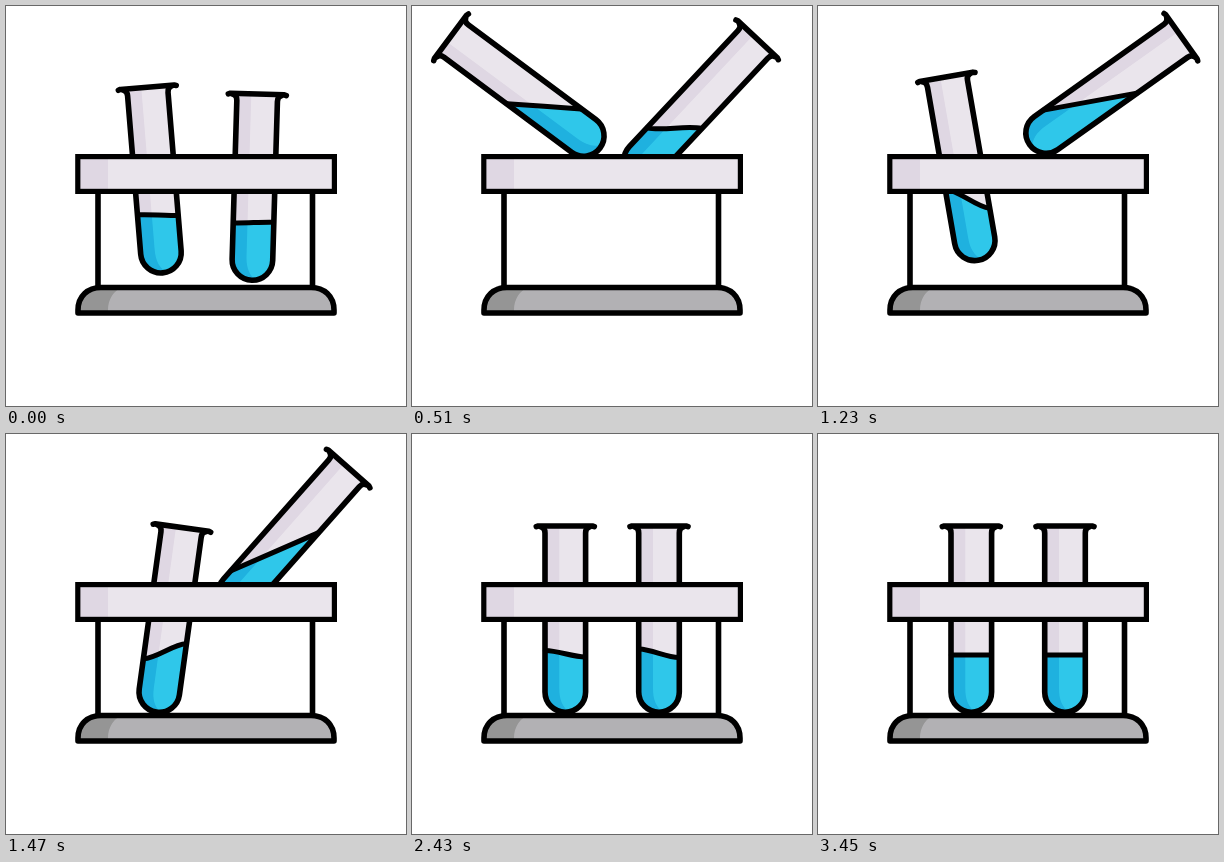
An HTML page that plays this animation: 400x400 px, repeating every 8.63 s.

```html
<!DOCTYPE html>
<html lang="en">
<head>
<meta charset="utf-8">
<title>Test tubes</title>
<style>
html, body { margin: 0; width: 100%; height: 100%; overflow: hidden; background: #fff; }
svg { display: block; width: 100%; height: 100%; }
.ink { fill: none; stroke: #000; stroke-width: 5.6; stroke-linecap: round; stroke-linejoin: round; }
</style>
</head>
<body>
<svg id="stage" viewBox="0 0 400 400">
  <defs>
    <clipPath id="glass"><path d="M-20.3-166V0a20.3 20.3 0 0 0 40.6 0V-166Z"/></clipPath>
    <clipPath id="foot"><path d="M72 307V304C72 290 82 281.5 95 281.5H305C318 281.5 328 290 328 304V307Z"/></clipPath>
  </defs>
  <path class="ink" d="M92 186V281M306.5 186V281"/>
  <g id="tubes"></g>
  <rect x="72" y="151" width="256" height="34" fill="#eae5ec"/>
  <rect x="72" y="151" width="30" height="34" fill="#dfd7e3"/>
  <rect class="ink" x="71.8" y="150.6" width="256.6" height="34.8" style="stroke-linejoin:miter;stroke-width:5.2"/>
  <g clip-path="url(#foot)">
    <rect x="70" y="280" width="260" height="29" fill="#b2b1b4"/>
    <path d="M70 280H119C109 283 102 292 102 304V309H70Z" fill="#959595"/>
  </g>
  <path class="ink" d="M72 307V304C72 290 82 281.5 95 281.5H305C318 281.5 328 290 328 304V307Z"/>
</svg>
<script>
const LOOP = 8630, STEP = 30, TILT = 55, REST = 3440;
const SHADE = 'V-4C-6 8-3 15 5 21H-21Z';

const clamp = u => Math.max(0, Math.min(1, u));
const span = (t, a, b) => clamp((t - a) / (b - a));
const smooth = u => u * u * (3 - 2 * u);

// Ease in and out along a bezier with handles at .35
function ease(u) {
  let lo = 0, hi = 1;
  for (let i = 0; i < 20; i++) {
    const m = (lo + hi) / 2;
    if (1.05 * m * (1 - m) + m * m * m < u) lo = m; else hi = m;
  }
  return smooth(lo);
}

// side: direction of lean; lag: delay of the drop
const tubes = [
  { x: 153.3, side: -1, lag: 0, rise: [-125, 650], fill: [-120, 840] },
  { x: 247, side: 1, lag: 480, rise: [-110, 990], fill: [-120, 1280] }
];

for (const tube of tubes) {
  const g = document.createElementNS('http://www.w3.org/2000/svg', 'g');
  g.innerHTML = `
    <g clip-path="url(#glass)">
      <rect x="-21" y="-166" width="42" height="188" fill="#eae5ec"/>
      <path d="M-21-166H-6${SHADE}" fill="#dfd7e3"/>
      <path class="liquid" fill="#2fc7ea"/>
      <path class="dark" fill="#1fb1df"/>
    </g>
    <path class="ink surface" style="stroke-width:5"/>
    <path class="ink" d="M-24-165Q-20.3-164-20.3-159V0a20.3 20.3 0 0 0 40.6 0V-159Q20.3-164 24-165"/>
    <path class="ink" d="M-29-165.3L-27-166H27L29-165.3"/>`;
  document.getElementById('tubes').append(g);
  tube.g = g;
  for (const name of ['liquid', 'dark', 'surface']) tube[name] = g.querySelector('.' + name);
}

// Lean in degrees; negative is the swing past upright
function lean(tube, t) {
  const d = t - tube.lag;
  if (d < 700) return TILT * ease(span(t, ...tube.rise));
  if (d < 1285) return TILT * (1 - span(d, 700, 1285) ** 2);
  if (d < 1420) return -8.5 * (1 - (1 - span(d, 1285, 1420)) ** 2);
  return -8.5 * (1 - smooth(span(d, 1420, 1720)));
}

// Half the height difference of the liquid across the tube
function slosh(tube, t) {
  const drop = 990 + tube.lag, land = 1440 + tube.lag;
  if (t < drop) return 43 * smooth(span(t, ...tube.fill));
  if (t < land) return 43 - 54 * smooth(span(t, drop, land));
  return -11 * (1 - span(t, land, REST)) * Math.cos((t - land) * 2 * Math.PI / 600);
}

function draw(t) {
  for (const tube of tubes) {
    const a = lean(tube, t), lift = Math.max(0, a / TILT);
    const x = tube.x - tube.side * 19 * lift, y = 258 - 132 * lift;
    tube.g.setAttribute('transform', `translate(${x} ${y}) rotate(${tube.side * a})`);

    const h = slosh(tube, t), mid = -37 - 0.4 * Math.abs(h);
    const d = -tube.side * h, left = mid - d, right = mid + d;
    const bend = 2 * d * Math.min(0.33, Math.abs(h) / 90);
    const top = `M-20 ${left}C-7 ${left + bend} 7 ${right - bend} 20 ${right}`;
    tube.surface.setAttribute('d', top);
    tube.liquid.setAttribute('d', top + 'H21V22H-21V' + left + 'Z');
    tube.dark.setAttribute('d', `M-21 ${left}L-6 ${left + 0.35 * (right - left)}` + SHADE);
  }
}

const start = performance.now();
function tick(now) {
  const t = Math.max(0, now - start) % LOOP;
  draw(Math.floor(t / STEP) * STEP);
  requestAnimationFrame(tick);
}
draw(0);
requestAnimationFrame(tick);
</script>
</body>
</html>
```
